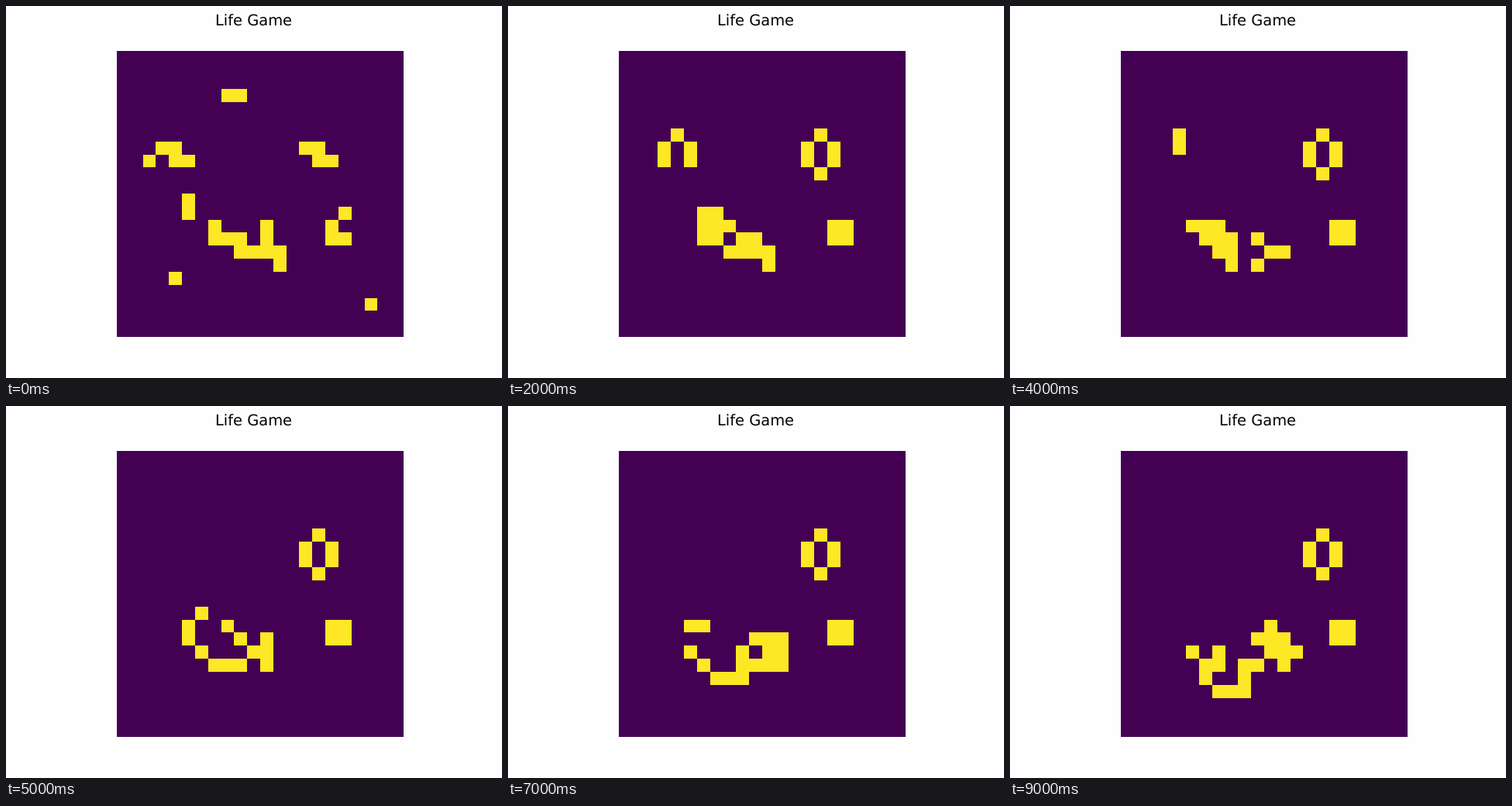
Recreate the animation shown at these times as an HTML page. Size 640 by 480 pixels, loop 10 s.

```html
<!DOCTYPE html>
<html lang="en">
<head>
<meta charset="utf-8">
<title>Life Game</title>
<style>
  html, body { margin: 0; width: 100%; height: 100%; overflow: hidden; background: #fefefe; }
  svg { display: block; }
  text {
    font: 19.44px "DejaVu Sans", sans-serif;
    text-anchor: middle;
    text-rendering: geometricPrecision;
  }
</style>
</head>
<body>
<svg width="640" height="480" viewBox="0 0 640 480">
  <text x="319.5" y="25">Life Game</text>
  <rect x="143" y="58" width="370" height="369" fill="#440154"/>
  <path id="cells" fill="#fee724" shape-rendering="crispEdges"/>
</svg>
<script>
const SIZE = 22, CELL = 370 / SIZE, LEFT = 143, TOP = 57;
const GENERATIONS = 10, STEP_MS = 1000;

const makeGrid = rule => Array.from({ length: SIZE }, (_, row) =>
  Array.from({ length: SIZE }, (_, col) => rule(row, col)));

function countNeighbours(grid, row, col) {
  let count = 0;
  for (let dr = -1; dr <= 1; dr++)
    for (let dc = -1; dc <= 1; dc++)
      if ((dr || dc) && grid[row + dr]?.[col + dc]) count++;
  return count;
}

const evolve = grid => makeGrid((row, col) => {
  const count = countNeighbours(grid, row, col);
  return count === 3 || (count === 2 && grid[row][col]);
});

// Brings a trail of cells to life, walking east (E) or south (S) from a start
function sow(grid, col, row, walk = "") {
  grid[row][col] = true;
  for (const heading of walk) {
    if (heading === "E") col++;
    else row++;
    grid[row][col] = true;
  }
}

function firstGeneration() {
  const grid = makeGrid(() => false);
  // Zigzags and the long staircase
  sow(grid, 3, 7, "ESE");
  sow(grid, 14, 7, "ESE");
  sow(grid, 7, 13, "SEESEEES");
  // Short bars and a corner
  sow(grid, 8, 3, "E");
  sow(grid, 5, 11, "S");
  sow(grid, 11, 13, "S");
  sow(grid, 16, 13, "SE");
  // Single cells
  sow(grid, 2, 8);
  sow(grid, 17, 12);
  sow(grid, 4, 17);
  sow(grid, 19, 19);
  return grid;
}

const edge = (origin, index) => Math.round(origin + index * CELL);

function cellPath(row, col) {
  return `M${edge(LEFT, col)} ${edge(TOP, row)}H${edge(LEFT, col + 1)}` +
    `V${edge(TOP, row + 1)}H${edge(LEFT, col)}Z`;
}

const gridPath = grid => grid.flatMap((line, row) =>
  line.map((alive, col) => alive ? cellPath(row, col) : "")).join("");

const paths = [];
let grid = firstGeneration();
for (let i = 0; i < GENERATIONS; i++) {
  paths.push(gridPath(grid));
  grid = evolve(grid);
}

const cells = document.getElementById("cells");
const start = performance.now();
let shown = -1;

function draw() {
  const elapsed = performance.now() - start;
  const generation = Math.floor(elapsed / STEP_MS) % GENERATIONS;
  if (generation !== shown) {
    cells.setAttribute("d", paths[generation]);
    shown = generation;
  }
  requestAnimationFrame(draw);
}
draw();
</script>
</body>
</html>
```
